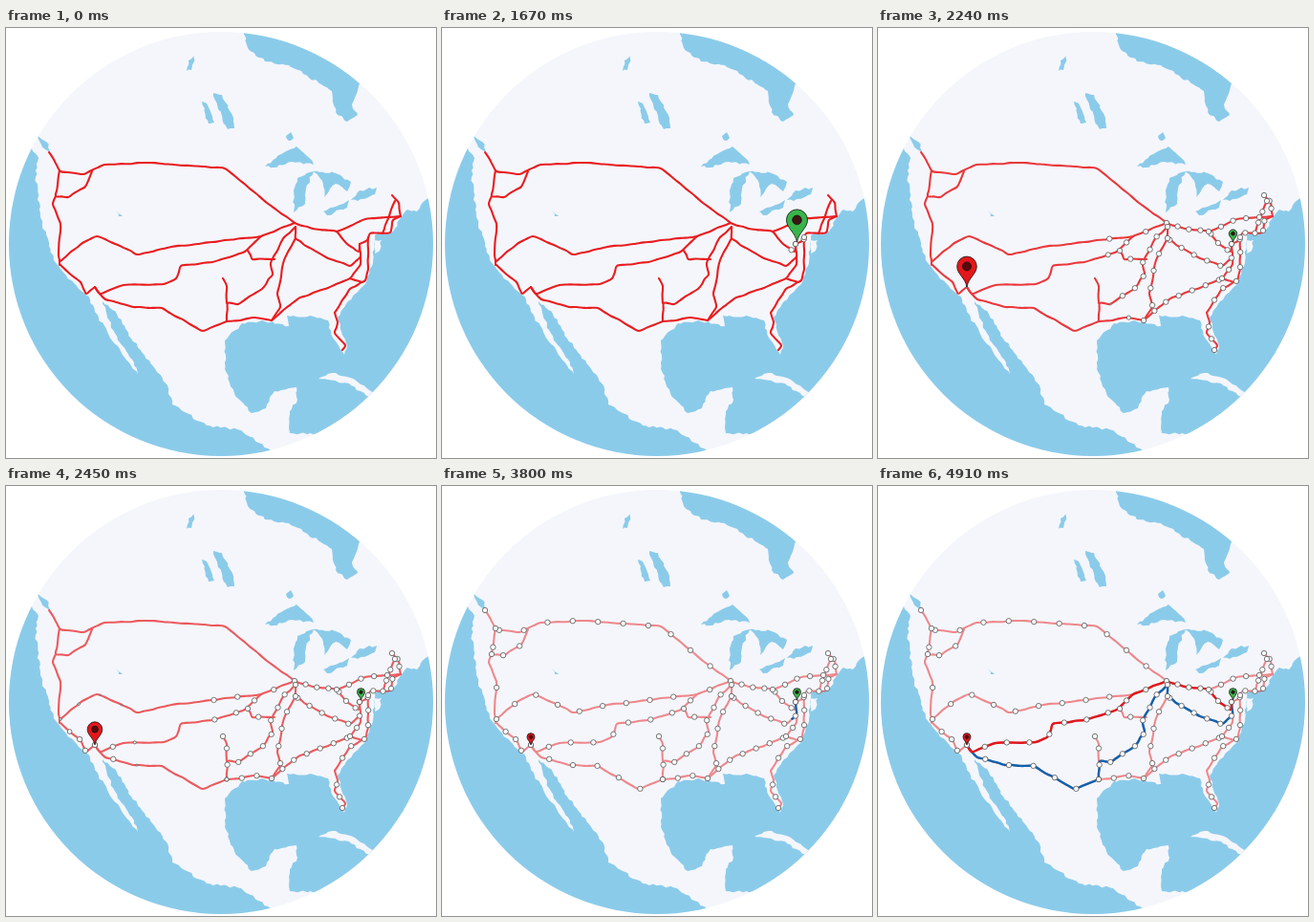
Animation, 450 px wide and 450 px high, one loop 9940 ms. Source, as an HTML page:

```html
<!DOCTYPE html>
<html lang="en">
<head>
<meta charset="utf-8">
<title>Rail map</title>
<style>
  html, body { margin: 0; width: 100%; height: 100%; overflow: hidden; background: #fff; }
  svg { display: block; width: 100vw; height: 100vh; }
  .line { fill: none; stroke: #e91c1f; stroke-width: 2.1; stroke-linecap: round; stroke-linejoin: round; }
  .dot { fill: #fff; stroke: #555; stroke-width: .8; }
  .pin { stroke: #151515; stroke-width: .8; }
  .pin * { vector-effect: non-scaling-stroke; }
</style>
</head>
<body>
<svg viewBox="0 0 450 450">
  <clipPath id="disc"><circle cx="225" cy="226" r="222"/></clipPath>
  <g clip-path="url(#disc)">
    <rect width="450" height="450" fill="#f4f6fb"/>
    <g id="map"></g>
  </g>
  <g id="rails"></g>
  <g id="routes"></g>
  <g id="dots"></g>
  <g id="pins"></g>
</svg>
<script>
const LOOP = 9940, WATER = '#8bcbea', LAND = '#f4f6fb';
const EAST = [371.5, 224], WEST = [93, 271];
const byId = id => document.getElementById(id);
const progress = (t, start, duration) => Math.max(0, Math.min(1, (t - start) / duration));
const distance = ([x, y], [u, v]) => Math.hypot(x - u, y - v);
const parse = text => text.trim().split(/\s+/).map(p => p.split(',').map(Number));

function add(parent, tag, attributes) {
  const node = document.createElementNS('http://www.w3.org/2000/svg', tag);
  for (const key in attributes) node.setAttribute(key, attributes[key]);
  return byId(parent).appendChild(node);
}

let seed = 11;
const noise = () => (seed = seed * 16807 % 2147483647) / 2147483647 - .5;

// Subdivides a line and shifts the new points a little; the key points stay.
function roughen(points, step, amount) {
  const result = [points[0]];
  for (let i = 1; i < points.length; i++) {
    const [x, y] = points[i - 1], [nx, ny] = points[i];
    const count = Math.ceil(distance(points[i - 1], points[i]) / step);
    for (let k = 1; k < count; k++) {
      result.push([x + (nx - x) * k / count + noise() * amount,
                   y + (ny - y) * k / count + noise() * amount]);
    }
    result.push(points[i]);
  }
  return result;
}

function shore(text, fill = WATER) {
  const points = parse(text);
  add('map', 'polygon', { points: roughen([...points, points[0]], 4, 2.4).join(' '), fill });
}

// Curve through all points
function smooth(points) {
  let d = 'M' + points[0];
  for (let i = 1; i < points.length; i++) {
    const a = points[i - 1], b = points[i];
    const before = points[i - 2] || a, after = points[i + 1] || b;
    const c1 = a.map((v, k) => v + (b[k] - before[k]) / 6);
    const c2 = b.map((v, k) => v - (after[k] - a[k]) / 6);
    d += `C${c1} ${c2} ${b}`;
  }
  return d;
}

// Stations spread out from both ends of the journey.
const stations = [];
function station(point, earliest) {
  const fromEast = distance(point, EAST), fromWest = distance(point, WEST);
  const wave = Math.min(1670 + .025 * fromEast ** 2, 2200 + 4 * fromWest);
  const first = fromEast < 12;
  stations.push({
    start: first ? 860 : Math.max(earliest, wave),
    duration: first ? 270 : earliest ? 300 : 150,
    node: add('dots', 'circle', { cx: point[0], cy: point[1], class: 'dot' })
  });
}

function rail(text, spacing, earliest = 0) {
  const points = roughen(parse(text), 9, 1);
  const path = add('rails', 'path', { d: smooth(points), class: 'line' });
  const length = path.getTotalLength(), stops = Math.round(length / spacing);
  for (let i = 0; i < stops; i++) {
    const { x, y } = path.getPointAtLength(length * i / stops);
    station([x, y], earliest);
  }
  return points;
}

// Pacific coast and peninsula
shore(`-9,118 27,126 34,136 31,156 36,198 50,243 76,273 88,284 93,297 106,318 122,342 138,362
  134,350 119,329 106,303 101,286 114,296 131,325 154,354 169,374 174,394 210,416 246,421 277,442 277,470 -9,470`);
shore('31,112 42,119 48,133 41,127');
// Atlantic and gulf
shore(`460,164 439,180 430,192 420,190 412,200 405,213 386,217 384,246 376,268 358,286 347,303
  357,333 354,342 342,324 337,306 322,302 294,301 296,312 268,306 247,309 229,327 229,357 240,385
  257,403 272,398 281,380 304,376 305,389 297,401 297,424 330,425 460,470`);
shore('385,222 393,222 391,233 386,236', LAND);
shore('327,367 341,361 365,368 390,385 380,386 359,372', LAND);
// Northern bay
shore('247,-5 253,21 271,35 296,39 311,48 330,59 341,66 345,88 357,98 368,91 362,80 371,57 390,40');
// Lakes
shore('271,145 288,132 304,124 315,134 322,143 300,140 280,146');
shore('305,157 322,150 314,168 313,184 301,193 301,170');
shore('321,150 345,152 361,161 357,171 345,163 333,177 331,160');
shore('332,192 359,180 357,188 336,196');
shore('361,180 370,170 388,167 386,174 368,181');
shore('293,113 298,109 301,115 296,118');
shore('217,68 226,70 238,94 239,105 232,106 222,85');
shore('205,77 210,79 218,99 212,100');
shore('191,34 198,27 194,44 189,45');
shore('115,191 122,197 118,197');

// Lines shared with the two routes
const mesa = rail(`93,271 98,278 123,269 165,268 178,262 183,249 216,245 250,234 267,218 302,204`, 23);
const capital = rail('302,204 321,210 346,213 357,226 369,234 370,226', 13);
const hills = rail('370,226 371,239 360,249 337,241 312,227 303,220 303,208', 16);
const plains = rail('303,208 291,219 277,246 279,258 268,273 243,289 232,288 231,307', 15);
const border = rail('231,307 206,317 163,293 133,292 104,284 98,278 93,271', 24);

// The rest of the network
rail('45,130 57,150 81,153 103,143 147,141 208,145 229,147 243,158 273,183 302,204', 27, 2690);
rail('56,149 52,176 65,177 83,166 90,150', 20, 2690);
rail('52,176 49,184 57,205 55,238 56,248', 38, 2690);
rail('93,271 84,278 78,266 57,248', 12);
rail('57,244 80,225 95,218 117,227 137,237 173,229 194,227 229,222 267,218', 24);
rail('231,307 245,306 260,303 278,306', 16);
rail('227,262 231,270 231,288', 12);
rail('253,233 258,242 281,242', 16);
rail('303,220 291,243 284,278 287,292 278,306', 18);
rail('278,306 293,293 308,282 337,272 360,262 371,247 371,239', 16);
rail('346,213 376,200 398,198 413,197', 14);
rail('370,226 378,222 381,215 402,214 405,201 413,197', 11);
rail('404,175 411,183 413,197', 9);
rail('407,181 397,206 394,215', 14);
rail('379,219 379,252 376,264 360,273 344,298', 16);
rail('360,262 373,266', 12);
rail('352,337 355,332 344,319 347,308 344,298', 15);

// Outbound in blue, then back in red, at one constant speed
function route(parts, stroke) {
  const node = add('routes', 'path', { d: smooth(parts.flat()), class: 'line' });
  node.style.stroke = stroke;
  node.style.strokeWidth = 2.4;
  return { node, length: node.getTotalLength() };
}
const outbound = route([hills, plains, border], '#0f62ae');
const inbound = route([mesa, capital], '#e0181e');

function reveal({ node, length }, travelled) {
  const shown = Math.max(0, Math.min(length, travelled));
  node.style.visibility = shown ? 'visible' : 'hidden';
  node.style.strokeDasharray = `${shown} ${length + 9}`;
}

function pin(place, fill, hole, start) {
  const id = 'pin' + start;
  const node = add('pins', 'g', { class: 'pin', id });
  add(id, 'path', { d: 'M0 0C-.05-.3-.32-.42-.32-.67A.32.32 0 0 1 .32-.67C.32-.42 .05-.3 0 0Z', fill });
  add(id, 'circle', { cy: -.67, r: .14, fill: hole });
  return { node, place, start };
}
const pins = [
  pin(EAST, '#39b44a', '#3a1713', 1670),
  pin(WEST, '#e3171b', '#5a090b', 2180)
];

function draw(t) {
  byId('rails').style.opacity = 1 - .5 * progress(t, 2060, 680);
  for (const { node, start, duration } of stations) {
    const scale = progress(t, start, duration);
    node.setAttribute('r', 2.7 * scale);
    node.style.visibility = scale ? 'visible' : 'hidden';
  }
  for (const { node, place, start } of pins) {
    const size = 34.5 - 22 * progress(t, start, 590);
    node.setAttribute('transform', `translate(${place}) scale(${size})`);
    node.style.visibility = t >= start ? 'visible' : 'hidden';
  }
  const travelled = progress(t, 3770, 1140) * (outbound.length + inbound.length);
  reveal(outbound, travelled);
  reveal(inbound, travelled - outbound.length);
}

const began = performance.now();
function tick() {
  draw((performance.now() - began) % LOOP);
  requestAnimationFrame(tick);
}
tick();
</script>
</body>
</html>
```
